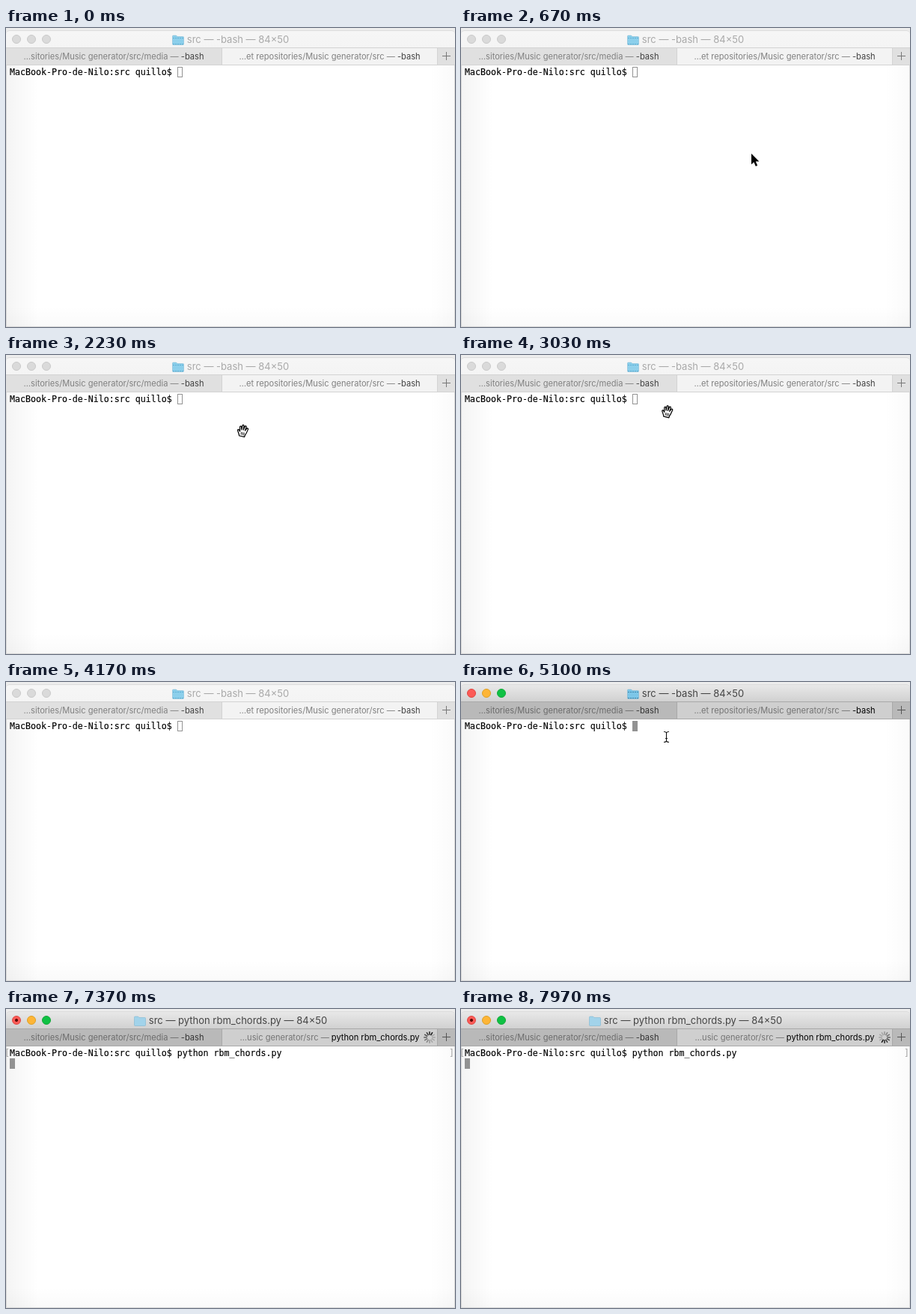
These frames come from a looping animation (600 by 400 pixels, 8000 ms). An HTML page:

```html
<!DOCTYPE html>
<html lang="en">
<head>
<meta charset="utf-8">
<title>Terminal</title>
<style>
  html, body { margin: 0; width: 100%; height: 100%; overflow: hidden; background: #fff; }
  #stage { position: relative; width: 600px; height: 400px; overflow: hidden; background: #ededed;
    font-family: Inter, "Open Sans", sans-serif; white-space: pre;
    --bar: linear-gradient(#f6f6f6, #f4f4f4); --title: #a9a9a9; --line: #d3d3d3;
    --back: #e0e0e0; --front: #f3f3f3; --path: #808080; --path2: #808080; --cmd: #404040; --cmd2: #404040;
    --folder: #8ccfeb; --dots: #5fb0d4; --plus: #777; }
  #stage.on { --bar: linear-gradient(#e8e8e8, #d1d1d1); --title: #444; --line: #a9a9a9;
    --back: #b9b9b9; --front: #cfcfcf; --path: #6c6c6c; --path2: #747474; --cmd: #333; --cmd2: #000;
    --folder: #7cc6e8; --dots: #3f87ab; --plus: #555; }
  #stage.busy { --folder: #a2d3ea; }
  #stage > * { position: absolute; box-sizing: border-box; }
  #bar { left: 0; top: 3px; width: 600px; height: 24px; background: var(--bar); border-radius: 5px 5px 0 0;
    border-top: 1px solid #dcdcdc; border-bottom: 1px solid var(--line); }
  #title { left: 0; top: 5px; width: 600px; height: 21px; line-height: 21px; font-size: 13px; color: var(--title);
    display: flex; justify-content: center; align-items: center; }
  #title svg { margin-right: 4px; }
  .light { top: 9px; width: 12px; height: 12px; border-radius: 50%; background: #dadada; border: 1px solid #cacaca; }
  .on .light { background: var(--c); border-color: var(--e); }
  .busy .light:first-of-type { background: radial-gradient(circle, #5d0c0a 1.6px, var(--c) 2.4px); }
  .tab { top: 27px; height: 23px; line-height: 22px; font-size: 11.1px; text-align: center;
    border-bottom: 1px solid var(--line); background: var(--front); color: var(--path2); }
  .tab b { font-weight: 400; color: var(--cmd2); }
  #back { left: 0; width: 289px; background: var(--back); color: var(--path); border-right: 1px solid var(--line); }
  #back b { color: var(--cmd); }
  #front { left: 289px; width: 287px; }
  #add { left: 576px; width: 24px; background: var(--back); border-left: 1px solid var(--line); }
  #add::before, #add::after { content: ""; position: absolute; background: var(--plus); }
  #add::before { left: 6px; top: 10px; width: 11px; height: 1px; }
  #add::after { left: 11px; top: 5px; width: 1px; height: 11px; }
  #page { left: 0; top: 50px; width: 600px; height: 350px; border: solid #d9d9d9; border-width: 0 1px 1px;
    background:
      linear-gradient(90deg, rgba(0,0,0,.045), transparent 42px, transparent 565px, rgba(0,0,0,.02)),
      linear-gradient(transparent 322px, rgba(0,0,0,.018)), #fff; }
  .term { font: 11.627px/14px "DejaVu Sans Mono", monospace; color: #000; -webkit-text-stroke: .15px; }
  #line { left: 5px; top: 52px; }
  .mark { top: 52px; color: #a8a8a8; }
  #caret { left: 0; top: 0; width: 7px; height: 14px; border: 1px solid #929292; }
  .on #caret { background: #929292; }
  #spin { left: 558px; top: 30px; }
  .ptr { left: 0; top: 0; overflow: visible; }
</style>
</head>
<body>
<div id="stage">
  <div id="bar"></div>
  <i class="light" style="left:8px;--c:#fc5b57;--e:#e0443f"></i>
  <i class="light" style="left:28px;--c:#fdb537;--e:#dfa023"></i>
  <i class="light" style="left:48px;--c:#0fc144;--e:#12a838"></i>
  <div id="title"><svg width="16" height="14"><path d="M.5 2q0-1 1-1h4l1.5 1.500h7.500q1 0 1 1v9q0 1-1 1h-13q-1 0-1-1z" fill="var(--folder)" stroke="#5fa9cb" stroke-opacity=".4"/><path id="dots" d="M1 4.500h14M1 12.500h14" fill="none" stroke="var(--dots)" stroke-dasharray="2 1"/></svg><span id="name"></span></div>
  <div class="tab" id="back">…sitories/Music generator/src/media — <b>-bash</b></div>
  <div class="tab" id="front"><span id="path"></span><b id="job"></b></div>
  <div class="tab" id="add"></div>
  <div id="page"></div>
  <div class="term" id="line"></div>
  <div class="term mark" style="left:-2px">[</div>
  <div class="term mark" style="left:592px">]</div>
  <div id="caret"></div>
  <svg id="spin" width="16" height="16" viewBox="-8 -8 16 16"></svg>
  <svg class="ptr" id="arrow" width="12" height="19"><path d="M0 0v14.500l3.400-3.100 2.400 5.600 2.400-1-2.400-5.400h4.600z" fill="#000" stroke="#fff" stroke-width="1" paint-order="stroke"/></svg>
  <svg class="ptr" id="hand" width="16" height="17"><g transform="rotate(14 8 9)" stroke="#000" stroke-linejoin="round" stroke-linecap="round"><path d="M4.500 16.300C4 14 1.500 11.500.8 9.800.4 8.600 1.800 8 2.700 9L4 10.400 2.600 4.800C2.300 3.200 4.200 2.800 4.600 4.200L5.700 7.600 5.400 2.200C5.400.6 7.400.6 7.600 2.200L8 7.400 8.900 2.400C9.300 1 11 1.400 10.900 2.800L10.500 7.800 12 4.600C12.700 3.300 14.300 4 13.900 5.400 13.200 8 13.400 11 12 13.200L11.600 16.300Z" fill="#fff" stroke-width="1.250"/><path d="M6.300 11v3M8.200 11v3M10.100 11v3" stroke-width=".8"/></g></svg>
  <svg class="ptr" id="beam" width="8" height="15"><path d="M.5.5q3 0 3.500 1.500q.5-1.500 3.500-1.500M4 2v11M.5 14.500q3 0 3.500-1.500q.5 1.500 3.500 1.500M2.500 9.500h3" fill="none" stroke="#111" stroke-width="1.100"/></svg>
</div>
<script>
const LOOP = 8000, FOCUS = 5100, FIRST_KEY = 5600, TYPE = 6030, COMPLETE = 6440, ENTER = 6870;
const PROMPT = 'MacBook-Pro-de-Nilo:src quillo$ ';
const COMMAND = 'python rbm_chords.py ';
const $ = id => document.getElementById(id);
const stage = $('stage'), marks = document.querySelectorAll('.mark');
const clamp = v => Math.min(1, Math.max(0, v));
const within = (t, a, b) => t >= a && t < b;
const show = (el, on) => { el.style.visibility = on ? 'visible' : 'hidden'; };
const put = (el, x, y) => { el.style.transform = `translate(${x}px,${y}px)`; };
const text = (el, s) => { if (el.textContent !== s) el.textContent = s; };

// Ease-out move from a to b
const glide = (t, start, end, a, b, power = 2) =>
  a + (b - a) * (1 - (1 - clamp((t - start) / (end - start))) ** power);

const ticks = Array.from({ length: 12 }, (_, i) => {
  const tick = document.createElementNS('http://www.w3.org/2000/svg', 'path');
  tick.setAttribute('d', 'M0-3.800V-7.300');
  tick.setAttribute('stroke', '#111');
  tick.setAttribute('stroke-width', '1.500');
  tick.setAttribute('stroke-linecap', 'round');
  tick.setAttribute('transform', `rotate(${i * 30})`);
  return $('spin').appendChild(tick);
});

function typedCount(t) {
  if (t < FIRST_KEY) return 0;
  if (t < TYPE) return 1;
  if (t < COMPLETE) return 2 + Math.floor((t - TYPE) / 58);
  return COMMAND.length;
}

function drawPointers(t) {
  show($('arrow'), within(t, 70, 1650));
  put($('arrow'), glide(t, 70, 640, 580, 388), glide(t, 70, 640, 8, 168));

  show($('hand'), within(t, 1650, 4170));
  const nudge = 2 * clamp((t - 3030) / 70);
  put($('hand'), glide(t, 2030, 2500, 380, 268, 1.81) - nudge,
                 glide(t, 2030, 2500, 160, 67, 2.3) - nudge);

  show($('beam'), within(t, FOCUS, FIRST_KEY));
  put($('beam'), 270.5, 66);
}

function drawSpinner(t) {
  const turn = Math.floor((Math.min(t, 7570) - ENTER) / 41.2);
  const head = turn + 1 + (t >= 7900) + (t >= 7965);
  ticks.forEach((tick, i) => {
    const age = ((head - i) % 12 + 12) % 12;
    tick.setAttribute('opacity', Math.max(.22, 1 - age * .1));
  });
}

function draw(t) {
  const busy = t >= ENTER, count = typedCount(t);
  stage.className = (t >= FOCUS ? 'on' : '') + (busy ? ' busy' : '');
  const job = busy ? 'python rbm_chords.py' : '-bash';
  text($('name'), `src — ${job} — 84×50`);
  text($('path'), busy ? '…usic generator/src — ' : '…et repositories/Music generator/src — ');
  text($('job'), job);
  text($('line'), PROMPT + COMMAND.slice(0, count));
  put($('caret'), busy ? 5 : 5 + 7 * (PROMPT.length + count), busy ? 66 : 52);
  show($('dots'), !busy);
  show($('spin'), busy);
  marks.forEach(m => show(m, busy));
  if (busy) drawSpinner(t);
  drawPointers(t);
}

const began = performance.now();
function tick() {
  draw((performance.now() - began) % LOOP);
  requestAnimationFrame(tick);
}
tick();
</script>
</body>
</html>
```
